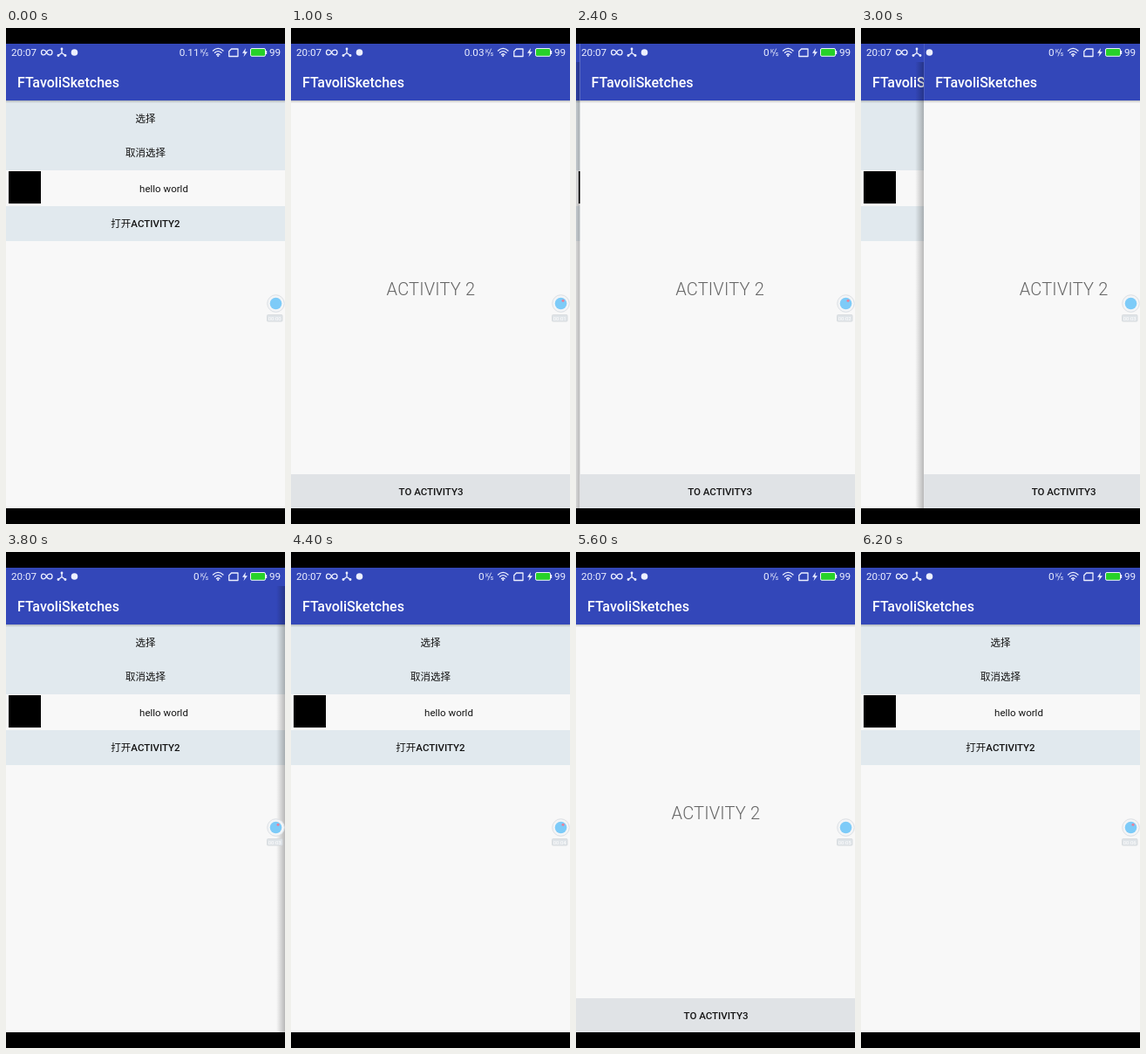
Recreate the animation shown at these times as an HTML page. Size 320x568 px, loop 6.4 s.

```html
<!DOCTYPE html>
<html lang="en">
<head>
<meta charset="utf-8">
<title>Swipe back</title>
<style>
  html, body { margin: 0; width: 100%; height: 100%; overflow: hidden; background: #000; }
  svg { display: block; width: 100vw; height: 100vh; }
  text { font-family: Roboto, "Noto Sans CJK SC", "Noto Sans CJK", sans-serif; }
  .title { font-size: 16px; font-weight: 450; fill: #fff; }
  .label { font-size: 11.5px; fill: #141414; text-anchor: middle; }
  .button { font-weight: 450; }
  .big { font-size: 20px; font-weight: 300; letter-spacing: .2px; fill: #666; text-anchor: middle; }
  .status { font-size: 11.7px; fill: #edf0ff; }
  .unit { font-size: 6.5px; }
  .icon { fill: none; stroke: #edf0ff; stroke-width: 1.3; stroke-linecap: round; stroke-linejoin: round; }
</style>
</head>
<body>
<svg viewBox="0 0 320 568" preserveAspectRatio="none">
  <defs>
    <linearGradient id="edge">
      <stop offset="0" stop-color="#000" stop-opacity="0"/>
      <stop offset="1" stop-color="#000" stop-opacity=".26"/>
    </linearGradient>
    <linearGradient id="drop" x2="0" y2="1">
      <stop offset="0" stop-color="#000" stop-opacity=".22"/>
      <stop offset="1" stop-color="#000" stop-opacity="0"/>
    </linearGradient>
    <g id="screen">
      <rect y="18" width="320" height="532" fill="#f8f8f8"/>
      <rect y="18" width="320" height="65" fill="#3347b9"/>
      <text class="title" x="13" y="67.5">FTavoliSketches</text>
    </g>
    <rect id="lift" y="83" width="320" height="3" fill="url(#drop)"/>
  </defs>

  <rect width="320" height="568"/>

  <g id="home">
    <use href="#screen"/>
    <path d="M0 83H320V163H0ZM0 204H320V244H0Z" fill="#e1e9ee"/>
    <use href="#lift"/>
    <text class="label button" x="160" y="107.7">选择</text>
    <text class="label button" x="160" y="146.7">取消选择</text>
    <rect x="3" y="164" width="37" height="37"/>
    <text class="label" x="181" y="187.7">hello world</text>
    <text class="label button" x="160" y="228">打开ACTIVITY2</text>
  </g>

  <g id="page">
    <rect id="shade" x="-10" y="39" width="10" height="511" fill="url(#edge)"/>
    <use href="#screen"/>
    <use href="#lift"/>
    <text class="big" x="160.5" y="305.5">ACTIVITY 2</text>
    <rect y="511" width="320" height="39" fill="#e0e3e6"/>
    <text class="label button" x="160.5" y="535.3">TO ACTIVITY3</text>
  </g>

  <g id="bar">
    <text class="status" x="6" y="32">20:07</text>
    <path class="icon" d="M46.5 28C44.5 24 40.5 24.5 40.5 28S44.5 32 46.5 28 53 24.5 53 28 48.5 32 46.5 28Z"/>
    <path class="icon" d="M64 24V28.5L60 31.5M64 28.5L68 31.5"/>
    <g fill="#edf0ff">
      <circle cx="64" cy="24" r="1.4"/>
      <circle cx="60" cy="31.5" r="1.4"/>
      <circle cx="68" cy="31.5" r="1.4"/>
      <circle cx="78.5" cy="28" r="3.8"/>
    </g>
    <text class="status" id="speed" x="221.5" y="32" text-anchor="end"></text>
    <text class="status unit" x="223" y="28.5">K</text>
    <path class="icon" d="M226 32L229.500 24" style="stroke-width:.8"/>
    <text class="status unit" x="228.800" y="32">s</text>
    <path class="icon" d="M237.5 26Q243.2 20.8 249 26M239.5 28.3Q243.2 25 247 28.3M241.5 30.5Q243.2 29 245 30.5"/>
    <circle cx="243.2" cy="32" r="1.1" fill="#edf0ff"/>
    <path class="icon" d="M258.5 24H266V32.5H255.8V26.7Z"/>
    <path d="M275 23L271 28.7H273.7L272.5 33L277 27.2H274.2Z" fill="#edf0ff"/>
    <rect x="280.5" y="23.5" width="17" height="8.8" rx="1.5" fill="#27d128" stroke="#edf0ff"/>
    <rect x="298" y="26" width="1.2" height="4" fill="#edf0ff"/>
    <text class="status" x="302" y="32">99</text>
  </g>

  <g id="recorder">
    <circle cx="309.5" cy="315.5" r="9.8" fill="#f3f5f7" stroke="#dcdfe3"/>
    <circle cx="309.5" cy="315.5" r="6.8" fill="#7dcbf8"/>
    <circle id="dot" cx="312" cy="312.3" r="1.5" fill="#ec7d96"/>
    <rect x="299.5" y="328.5" width="17.5" height="7.5" rx="1" fill="#dfe4e8" stroke="#d3d7db" stroke-width=".8"/>
    <text id="clock" x="308.2" y="334.6" text-anchor="middle" font-size="6" fill="#fff"></text>
  </g>
</svg>
<script>
  const LOOP = 6400, WIDTH = 320;
  const el = id => document.getElementById(id);
  const [page, shade, speed, dot, clock] = ["page", "shade", "speed", "dot", "clock"].map(el);

  const span = (t, start, length) => Math.min(1, Math.max(0, (t - start) / length));
  const slideIn = (t, start) => WIDTH * (1 - span(t, start, 400)) ** 2;
  const slideOut = (t, start) => WIDTH * span(t, start, 350) ** 2;
  const drag = t => WIDTH * span(t, 2150, 1650) ** 2.25;

  // Left edge of the second screen
  function pageX(t) {
    if (t < 2150) return slideIn(t, 500);
    if (t < 4400) return drag(t);
    return t < 5600 ? slideIn(t, 4918) : slideOut(t, 5650);
  }

  function draw(t) {
    const x = pageX(t);
    const dragging = t > 2150 && t < 3950;
    page.setAttribute("transform", `translate(${x.toFixed(2)} 0)`);
    page.style.display = x < WIDTH || dragging ? "" : "none";
    shade.style.display = dragging ? "" : "none";
    speed.textContent = t < 600 ? "0.11" : t < 1800 ? "0.03" : "0";
    dot.style.display = t % 2500 > 700 ? "" : "none";
    clock.textContent = "00:0" + Math.floor(t / 1000);
  }

  const begin = performance.now();
  function tick() {
    draw((performance.now() - begin) % LOOP);
    requestAnimationFrame(tick);
  }
  tick();
</script>
</body>
</html>
```
